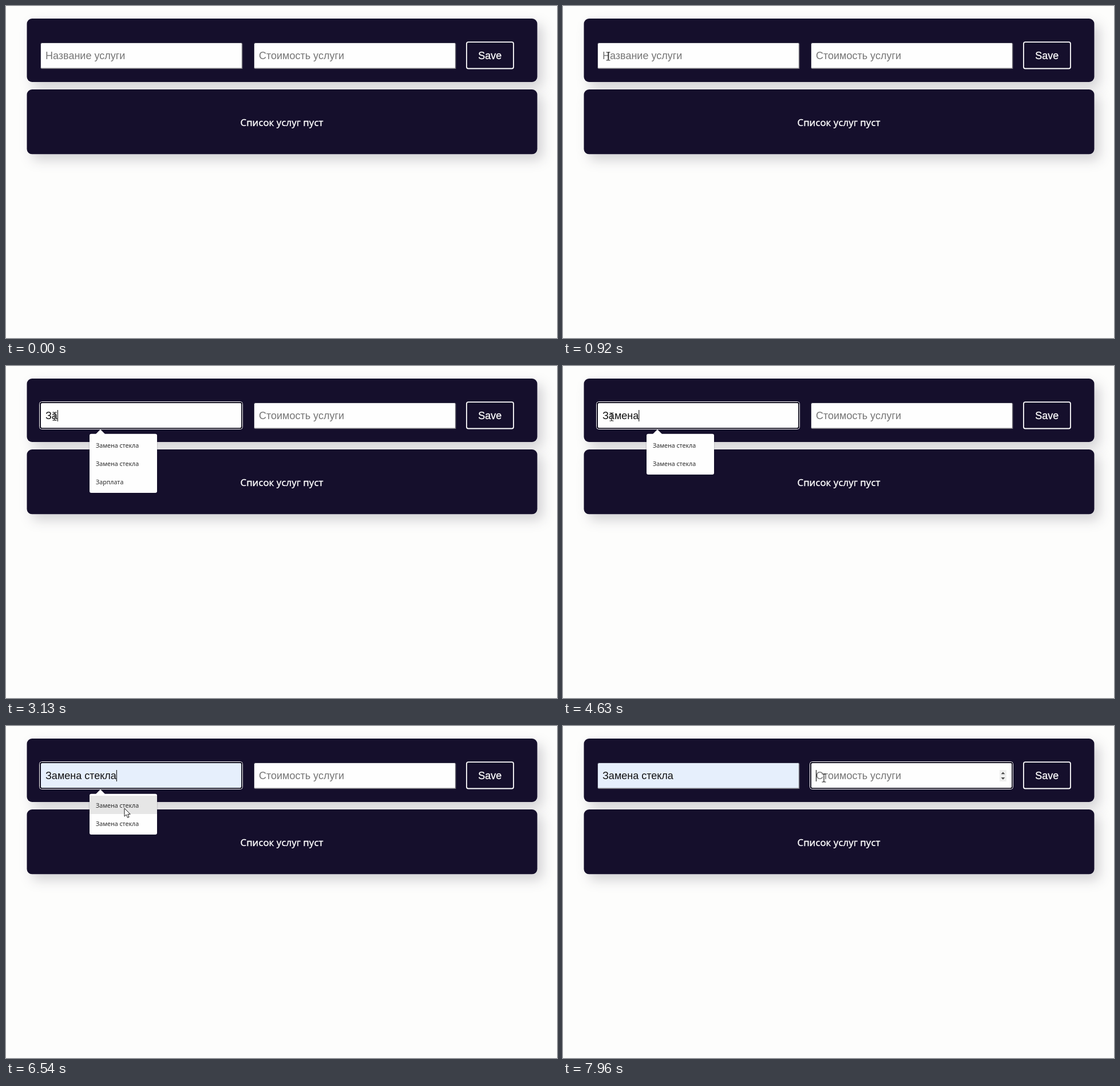
These frames come from a looping animation (963x581 px, 8 s). An HTML page:

```html
<!DOCTYPE html>
<html lang="ru">
<head>
<meta charset="utf-8">
<title>Список услуг</title>
<style>
  html, body { margin: 0; width: 100%; height: 100%; overflow: hidden; background: #fdfdfc; }
  svg { display: block; width: 100vw; height: 100vh; }
  filter { color-interpolation-filters: sRGB; }
  .field { font: 18px "Liberation Sans", Arial, sans-serif; }
  .note { font: 16.8px "Noto Sans", sans-serif; text-anchor: middle; }
  .light { fill: #fff; stroke: #fff; stroke-width: .3; }
  #list text { font: 10.6px "Noto Sans", sans-serif; fill: #2b2b2b; }
  .card { fill: #150f2c; }
  .shaded { filter: url(#shade); }
</style>
</head>
<body>
<svg id="stage" viewBox="0 0 963 581">
  <defs>
    <filter id="shade" x="-10%" y="-50%" width="120%" height="220%">
      <feDropShadow dx="9" dy="10" stdDeviation="10.5" flood-color="#1a1728" flood-opacity=".19"/>
    </filter>
    <filter id="soft" x="-10%" y="-10%" width="120%" height="125%">
      <feDropShadow dx="0" dy="1" stdDeviation="1.2" flood-color="#150f2c" flood-opacity=".35"/>
    </filter>
  </defs>
  <rect width="963" height="581" fill="#fdfdfc"/>
  <g class="shaded"><rect class="card" x="36.5" y="22" width="892" height="111" rx="9"/></g>
  <g class="shaded"><rect class="card" x="36.5" y="146" width="892" height="113.3" rx="9"/></g>
  <text class="note light" x="482" y="210">Список услуг пуст</text>
  <g id="inputs"></g>
  <g id="spinner">
    <rect x="763" y="77" width="12" height="20" fill="#efefef"/>
    <path d="M765.6 84.3l3.4-3.8 3.4 3.8zM765.6 90l3.4 3.8 3.4-3.8z" fill="#4c4c4c"/>
  </g>
  <rect x="805" y="63.2" width="82" height="46.3" rx="3" fill="none" stroke="#fff" stroke-width="1.8"/>
  <text class="field light" x="825.3" y="92.8">Save</text>
  <path id="caret" d="M0 77v20" stroke="#111" stroke-width="1.1"/>
  <g id="list" filter="url(#soft)">
    <path d="M156.5 119.5l8.5-8.5 8.5 8.5z" fill="#fefefe"/>
    <rect id="panel" x="146" y="118.7" rx="3" fill="#fefefe"/>
    <rect id="hover" x="146" width="118" height="32" fill="#e6e6e6"/>
    <g id="rows"></g>
  </g>
  <path id="beam" d="M-3.5 -7h2.4L0 -6 1.1 -7h2.4M0 -6V6M-3.5 7h2.4L0 6 1.1 7h2.4" fill="none" stroke="#222" stroke-width="1.2"/>
  <path id="arrow" d="M0 0V14.2L3.3 11.2 5.6 16.4 8 15.3 5.8 10.3H10.2Z" fill="#fff" stroke="#1a1a1a" stroke-width="1" stroke-linejoin="round"/>
</svg>
<script>
const LOOP = 8000;
const SERVICE = 'Замена стекла';
const SAVED = ['Надежда', SERVICE, 'Vetelkina Lyubava', 'vetelkina.lyubava.ko', '12', 'Vetelkin Savely'];
const FOCUS_NAME = 1100, OPEN = 1590, PICK = 6880, FOCUS_PRICE = 7740;
const KEYS = [2660, 2900, 3460, 3700, 3960, 4250];
const BLINK_STARTS = [FOCUS_NAME, ...KEYS, PICK, FOCUS_PRICE];
// time, x, y
const PATH = [
  [40, 28, -18], [800, 78, 87], [920, 79, 88], [1300, 85, 89], [2900, 85, 88], [4300, 85, 89],
  [5250, 85, 89], [5850, 172, 116], [6480, 207, 144], [6950, 207, 144], [7600, 450, 94], [7760, 456, 91]
];

const $ = id => document.getElementById(id);
const show = (el, on) => el.setAttribute('visibility', on ? 'visible' : 'hidden');

function make(tag, attrs, parent) {
  const el = document.createElementNS('http://www.w3.org/2000/svg', tag);
  for (const k in attrs) el.setAttribute(k, attrs[k]);
  return parent.appendChild(el);
}

function makeInput(x, hint) {
  const g = make('g', { transform: `translate(${x} 64)` }, $('inputs'));
  const box = make('rect', { x: .5, y: .5, width: 352.5, height: 45.3, rx: 2.5, stroke: '#39364a' }, g);
  const edge = make('path', { d: 'M352.6 1.5V45.3H1.5', fill: 'none', stroke: '#77757c', 'stroke-width': 1.4 }, g);
  const ring = make('g', { fill: 'none' }, g);
  make('rect', { x: -1.5, y: -1.5, width: 355, height: 48, rx: 4, stroke: '#fff' }, ring);
  make('rect', { x: -.1, y: -.1, width: 352.2, height: 45.2, rx: 3, stroke: '#0b0818', 'stroke-width': 1.8 }, ring);
  const text = make('text', { class: 'field', x: 9, y: 28.8 }, g);
  return {
    text,
    set(value, focused, filled) {
      text.textContent = value || hint;
      text.setAttribute('fill', value ? '#111' : '#757575');
      box.setAttribute('fill', filled ? '#e6effc' : '#fefefe');
      show(edge, !focused);
      show(ring, focused);
    }
  };
}

const nameInput = makeInput(60, 'Название услуги');
const priceInput = makeInput(433, 'Стоимость услуги');
const rows = SAVED.map((_, i) => make('text', { x: 157, y: 142.8 + 32 * i }, $('rows')));

function pointerAt(t) {
  const i = PATH.findIndex(p => p[0] > t);
  if (i === 0) return PATH[0].slice(1);
  if (i < 0) return PATH[PATH.length - 1].slice(1);
  const [t0, x0, y0] = PATH[i - 1], [t1, x1, y1] = PATH[i];
  const u = (t - t0) / (t1 - t0), e = u * u * (3 - 2 * u);
  return [x0 + (x1 - x0) * e, y0 + (y1 - y0) * e];
}

function choices(count) {
  if (!count) return SAVED;
  return count < 3 ? [SERVICE, SERVICE, 'Зарплата'] : [SERVICE, SERVICE];
}

function drawList(items, open, hovered) {
  show($('list'), open);
  $('panel').setAttribute('width', items.length > 3 ? 139 : 118);
  $('panel').setAttribute('height', 7.3 + 32 * items.length);
  $('hover').setAttribute('y', 122 + 32 * Math.max(hovered, 0));
  show($('hover'), open && hovered >= 0);
  rows.forEach((row, i) => row.textContent = items[i] || '');
}

function drawPointer(x, y) {
  const inside = [60, 433].some(l => x >= l && x <= l + 353) && y >= 64 && y <= 110;
  for (const id of ['beam', 'arrow']) {
    $(id).setAttribute('transform', `translate(${x} ${y})`);
    show($(id), (id === 'beam') === inside);
  }
  return inside;
}

function drawCaret(t, onPrice, typed) {
  const start = BLINK_STARTS.filter(s => s <= t).pop();
  const x = onPrice ? 442.5 : 69.5 + (typed ? nameInput.text.getComputedTextLength() : 0);
  $('caret').setAttribute('transform', `translate(${x})`);
  show($('caret'), start !== undefined && (t - start) % 1000 < 500);
}

function draw(t) {
  const [x, y] = pointerAt(t);
  const count = KEYS.filter(k => k <= t).length;
  const open = t >= OPEN && t < PICK;
  const items = choices(count);
  const row = Math.floor((y - 122) / 32);
  const hovered = open && x >= 146 && x <= 264 && row >= 0 && row < items.length ? row : -1;
  const filled = t >= PICK || hovered >= 0;
  const value = filled ? SERVICE : SERVICE.slice(0, count);
  const onPrice = t >= FOCUS_PRICE;

  nameInput.set(value, t >= FOCUS_NAME && !onPrice, filled);
  priceInput.set('', onPrice, false);
  drawList(items, open, hovered);
  drawCaret(t, onPrice, value);
  const inside = drawPointer(x, y);
  show($('spinner'), onPrice || (inside && x > 433));
}

const begin = performance.now();
function tick() {
  draw((performance.now() - begin) % LOOP);
  requestAnimationFrame(tick);
}
tick();
</script>
</body>
</html>
```
